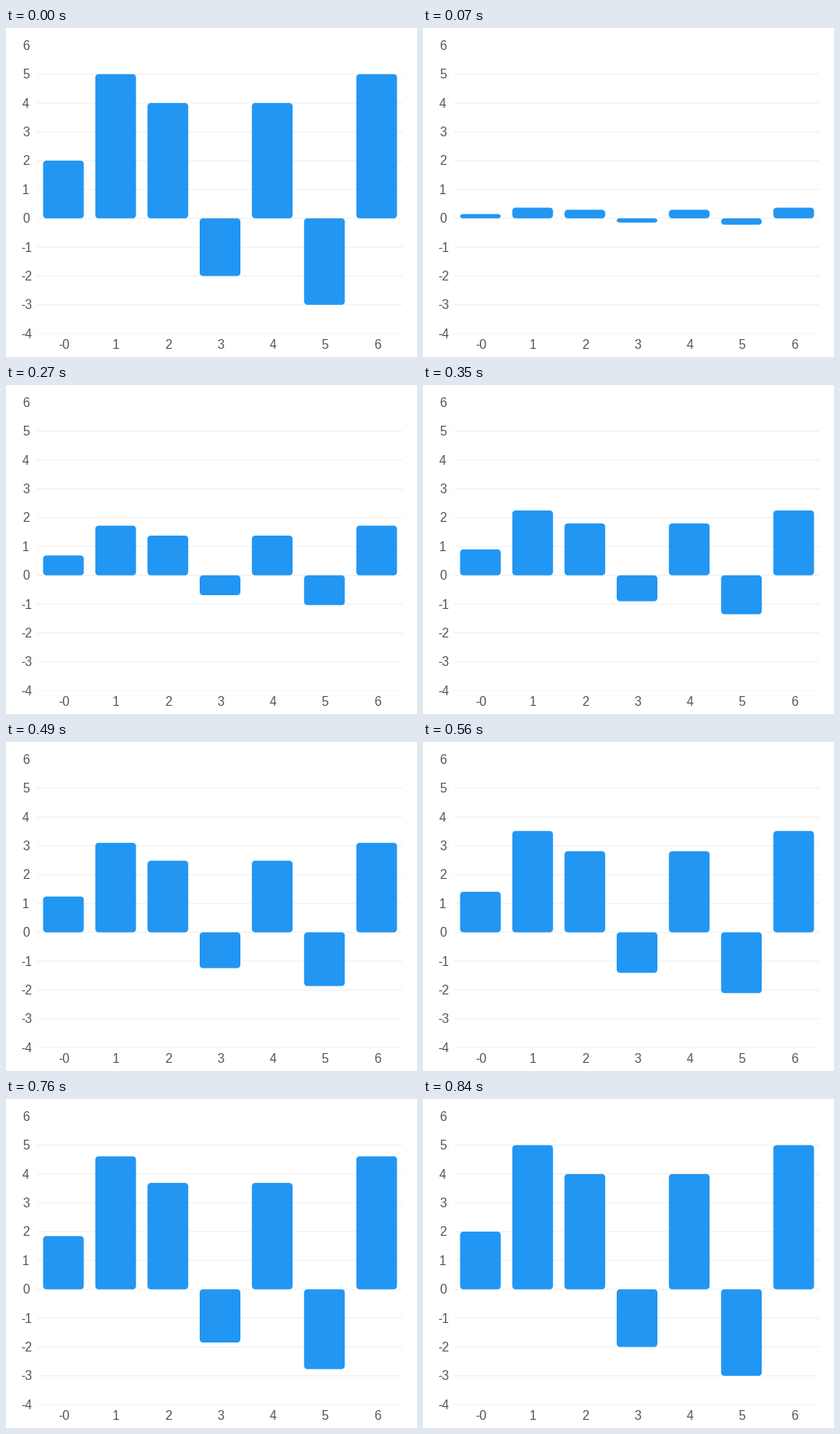
Animation, 505 px wide and 404 px high, one loop 2040 ms. Source, as a matplotlib script:

```python
import numpy as np
import matplotlib.pyplot as plt
from matplotlib.animation import FuncAnimation
from matplotlib.patches import Polygon

W, H, DPI = 505, 404, 100
PX = 72 / DPI                      # one pixel in points
LEFT, RIGHT = 38.5, 487.5
ZERO, UNIT = 233.7, 35.4
VALUES = [2, 5, 4, -2, 4, -3, 5]
SLOT = (RIGHT - LEFT) / len(VALUES)
BAR_W, RADIUS = 50, 4
INTERVAL, LOOP = 10, 2040

# The bars refresh at these times (ms) and hold in between.
TICKS = np.array([70, 130, 200, 270, 350, 420, 490, 560, 620, 690, 760, 840])
GROWTH = ([70, 200, 350, 490, 690, 840], [0.074, 0.252, 0.45, 0.621, 0.855, 1])


def level_y(value):
    return ZERO - value * UNIT


def growth(ms):
    passed = TICKS[TICKS <= ms]
    return np.interp(passed[-1], *GROWTH) if passed.size else 1.0


def rounded_bar(cx, value):
    """Outline of a rounded bar between zero and value."""
    top, bottom = sorted((ZERO, level_y(value)))
    ry = min(RADIUS, (bottom - top) / 2)
    angle = np.concatenate([np.linspace(q, q + 1, 9) for q in range(4)]) * np.pi / 2
    quarter = np.repeat(np.arange(4), 9)
    sx = np.where((quarter == 0) | (quarter == 3), 1, -1)
    sy = np.where(quarter < 2, 1, -1)
    x = cx + sx * (BAR_W / 2 - RADIUS) + RADIUS * np.cos(angle)
    y = (top + bottom) / 2 + sy * ((bottom - top) / 2 - ry) + ry * np.sin(angle)
    return np.column_stack([x, y])


fig = plt.figure(figsize=(W / DPI, H / DPI), dpi=DPI, facecolor="white")
ax = fig.add_axes([0, 0, 1, 1])
ax.set(xlim=(0, W), ylim=(H, 0))
ax.axis("off")


def label(x, y, number):
    ax.text(x, y + 5.5, number, ha="center", va="baseline", color="#555555",
            family="Liberation Sans", size=15.5 * PX)


for v in range(-4, 7):
    y = level_y(v)
    label(24.3 if v >= 0 else 25, y, str(v))
    if v < 6:
        ax.plot([LEFT - 0.5, RIGHT - 0.5], [y, y], lw=PX, snap=False, zorder=1,
                color="#f5f5f5" if v == -4 else "#eeeeee", solid_capstyle="butt")

centers = [LEFT + SLOT * (i + 0.5) for i in range(len(VALUES))]
bars = []
for i, (cx, v) in enumerate(zip(centers, VALUES)):
    label(cx + 0.7, 388.4, str(i) if i else "-0")
    bars.append(ax.add_patch(Polygon(rounded_bar(cx, v), fc="#2196f3", lw=0, zorder=2)))


def draw(frame):
    scale = growth(frame * INTERVAL)
    for bar, cx, v in zip(bars, centers, VALUES):
        bar.set_xy(rounded_bar(cx, v * scale))
    return bars


anim = FuncAnimation(fig, draw, frames=LOOP // INTERVAL, interval=INTERVAL,
                     init_func=lambda: draw(0), repeat=True, repeat_delay=0)
plt.show()
```
